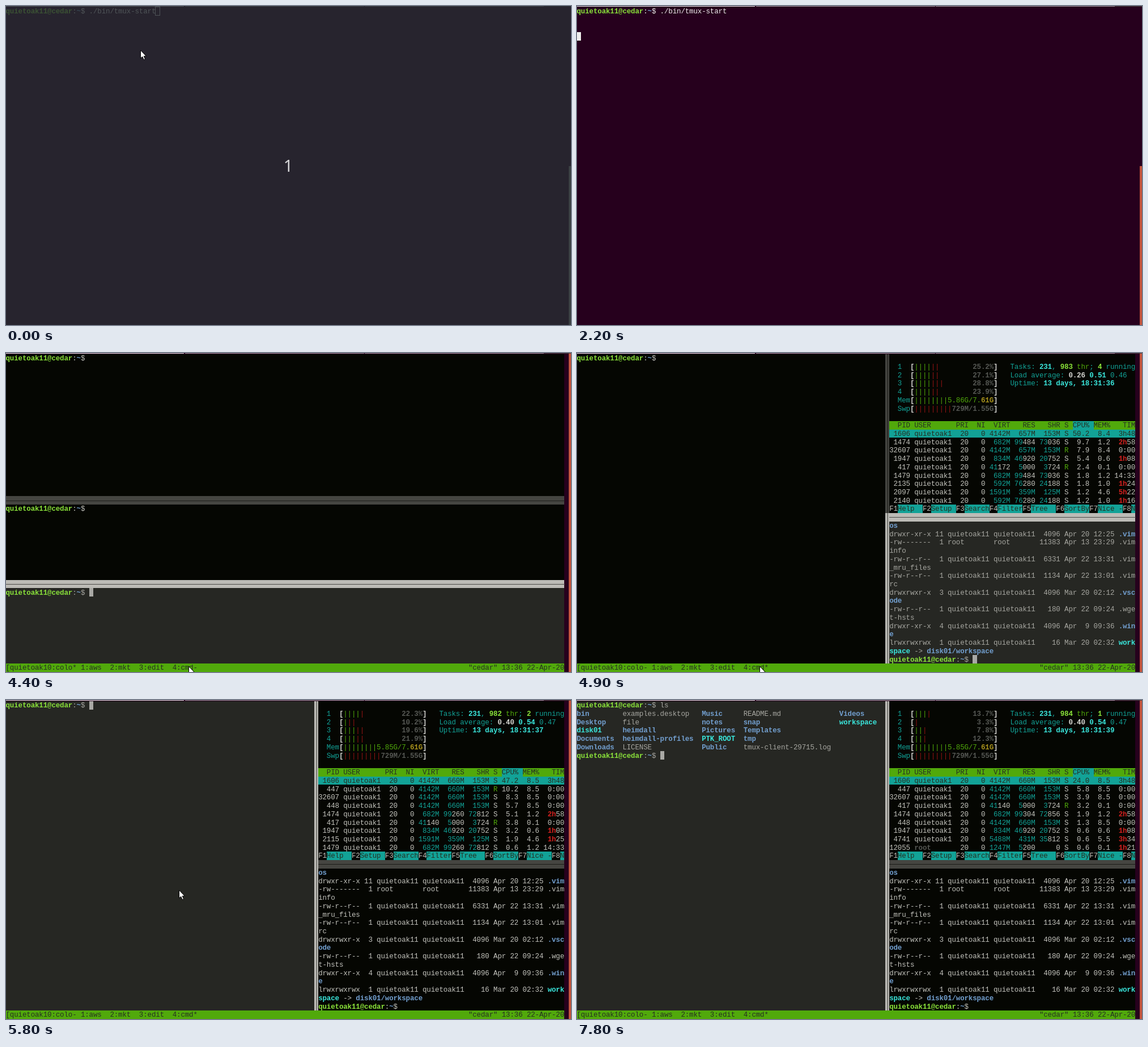
Recreate the animation shown at these times as an HTML page with a canvas. Size 997x562 px, loop 8 s.

```html
<!DOCTYPE html>
<html lang="en">
<head>
<meta charset="utf-8">
<title>Terminal session</title>
<style>
html, body { margin: 0; width: 100%; height: 100%; overflow: hidden; background: #26001d; }
canvas { display: block; }
</style>
</head>
<body>
<canvas id="stage" width="997" height="562"></canvas>
<script>
const ctx = document.getElementById('stage').getContext('2d');
const LOOP = 8000, CW = 7.355, CH = 14.73, TOP = 2, COLS = 134;
const USER = 'quietoak11', SHORT = 'quietoak1', HOST = 'cedar';
const PURPLE = '#26001d', IDLE = '#050602', ACTIVE = '#262723';
const GREEN = '#51a90b', CYAN = '#12a297';

// Upper-case codes are bold
const INK = {
  G: '#8ae23a', B: '#729fcf', C: '#3ae6dc', R: '#d0201f', D: '#555753', W: '#d6d6d2', Y: '#a8921c',
  g: GREEN, c: CYAN, r: '#921313', k: '#262f22', e: '#eeeeec', w: '#c2c2bc'
};
const setActive = on => { INK.w = on ? '#a6a6a0' : '#c2c2bc'; };

const colX = c => c * CW - 0.5;
const rowY = r => TOP + r * CH;

function rect(x, y, w, h, color) {
  ctx.fillStyle = color;
  ctx.fillRect(x, y, w, h);
}

function cells(row, col, rows, cols, color) {
  const x = Math.max(0, Math.round(colX(col))), y = Math.round(rowY(row));
  rect(x, y, Math.round(colX(col + cols)) - x, Math.round(rowY(row + rows)) - y, color);
}

// Writes text on the cell grid; ^x switches to ink x
function put(row, col, text) {
  const y = Math.round(rowY(row) + 11.3);
  const parts = ('^w' + text).split(/\^(.)/);
  for (let i = 1; i < parts.length; i += 2) {
    const code = parts[i];
    ctx.fillStyle = INK[code];
    ctx.font = (code < 'a' ? 'bold ' : '') + '12.5px "Liberation Mono", monospace';
    for (const ch of parts[i + 1]) {
      if (ch !== ' ') ctx.fillText(ch, colX(col), y);
      col++;
    }
  }
}

const prompt = (row, col, cmd = '', ink = 'w') =>
  put(row, col, `^G${USER}@${HOST}^${ink}:^B~^${ink}$ ${cmd}`);

const BLINKS = [1600, 1900, 2500, 3100, 3700, 4300, 5500, 5700, 6100, 6700, 7300, 7500];
const blinkOn = t => BLINKS.filter(b => b <= t).length % 2 === 0;

function cursor(t, row, col, color = '#a9a9a5') {
  if (blinkOn(t)) cells(row, col, 1, 1, color);
}

function tabStrip() {
  rect(0, 0, 314, 1, '#f4f2f3');
  rect(316, 0, 316, 1, '#a79fa5');
  rect(633, 0, 316, 1, '#a79fa5');
  rect(949, 0, 48, 1, '#47403f');
}

function shell(t) {
  rect(0, 0, 997, 562, PURPLE);
  tabStrip();
  prompt(0, 0, './bin/tmux-start', 'e');
  rect(993, 282, 4, 280, t < 1100 ? '#8d8b89' : t < 1200 ? '#a87058' : '#c2553d');
  if (t < 1100) {
    ctx.strokeStyle = INK.e;
    ctx.lineWidth = 1;
    ctx.strokeRect(263.5, 1.5, 8, 15);
  } else if (t < 2200) cursor(t, 0, 36, INK.e);
  else cursor(t, 3, 0, INK.e);
}

function countdown() {
  rect(0, 0, 997, 562, 'rgba(39,45,50,.8)');
  ctx.fillStyle = '#d6d6d8';
  ctx.font = '29px "Noto Sans", sans-serif';
  ctx.textAlign = 'center';
  ctx.fillText('1', 498, 292);
  ctx.textAlign = 'left';
}

const edge = on => on ? ['#bcbbb6', '#4a4a46'] : ['#454541', '#1c1c19'];

function hBorder(row, col, on) {
  const [fill, line] = edge(on), x = Math.max(0, colX(col));
  cells(row, col, 1, COLS - col, fill);
  rect(x, Math.round(rowY(row) + 7.4), 986 - x, 1, line);
}

function vBorder(row, rows, on) {
  const [fill, line] = edge(on);
  cells(row, 74, rows, 1, fill);
  rect(547.5, rowY(row), 1.2, rows * CH, line);
}

function tmuxFrame(second) {
  rect(0, 0, 997, 562, PURPLE);
  tabStrip();
  rect(993, 1, 4, 561, '#c2553d');
  cells(0, 0, 37, COLS, IDLE);
  cells(37, 0, 1, COLS, GREEN);
  const [a, b] = second ? '-*' : '*-';
  put(37, 0, `^k[${SHORT}0:colo${a} 1:aws  2:mkt  3:edit  4:cmd${b}`);
  put(37, 111, `^k"${HOST}" 13:36 22-Apr-20`);
}

function firstWindow(t) {
  tmuxFrame(false);
  cells(28, 0, 9, COLS, ACTIVE);
  hBorder(17, 0, false);
  hBorder(27, 0, true);
  setActive(false);
  prompt(0, 0);
  prompt(18, 0);
  setActive(true);
  prompt(28, 0);
  cursor(t, 28, 20);
}

// cpu: green bars, red bars, percent; procs: pid virt res shr state cpu mem time [user]
const SAMPLES = [
  {
    from: 4900, cpu: [[4, 2, '25.2'], [4, 2, '27.1'], [4, 3, '28.8'], [4, 2, '23.9']],
    thr: 983, run: 4, load: ['0.26', '0.51', '0.46'], sec: 36, mem: '5.86',
    procs: `1606 4142M 657M 153M S 50.2 8.4 3h48
1474 682M 99484 73036 S 9.7 1.2 2h58
32607 4142M 657M 153M R 7.9 8.4 0:00
1947 834M 46920 20752 S 5.4 0.6 1h08
417 41172 5000 3724 R 2.4 0.1 0:00
1479 682M 99484 73036 S 1.8 1.2 14:33
2135 592M 76280 24188 S 1.8 1.0 1h24
2097 1591M 359M 125M S 1.2 4.6 5h22
2140 592M 76280 24188 S 1.2 1.0 1h16`
  },
  {
    from: 5800, cpu: [[4, 1, '22.3'], [1, 2, '10.2'], [3, 2, '19.6'], [3, 2, '21.9']],
    thr: 982, run: 2, load: ['0.40', '0.54', '0.47'], sec: 37, mem: '5.85',
    procs: `1606 4142M 660M 153M S 47.2 8.5 3h48
447 4142M 660M 153M R 10.2 8.5 0:00
32607 4142M 660M 153M S 8.3 8.5 0:00
448 4142M 660M 153M S 5.7 8.5 0:00
1474 682M 99260 72812 S 5.1 1.2 2h58
417 41140 5000 3724 R 3.8 0.1 0:00
1947 834M 46920 20752 S 3.2 0.6 1h08
2115 1591M 359M 125M S 1.9 4.6 1h25
1479 682M 99260 72812 S 0.6 1.2 14:33`
  },
  {
    from: 7700, cpu: [[3, 1, '13.7'], [0, 1, '3.3'], [2, 1, '7.8'], [2, 1, '12.3']],
    thr: 984, run: 1, load: ['0.40', '0.54', '0.47'], sec: 39, mem: '5.85',
    procs: `1606 4142M 660M 153M S 24.0 8.5 3h48
447 4142M 660M 153M S 5.8 8.5 0:00
32607 4142M 660M 153M S 3.9 8.5 0:00
417 41140 5000 3724 R 3.2 0.1 0:00
1474 682M 99304 72856 S 1.9 1.2 2h58
448 4142M 660M 153M S 1.3 8.5 0:00
1947 834M 46920 20752 S 0.6 0.6 1h08
4741 5488M 431M 35812 S 0.6 5.5 3h34
12055 1247M 5200 0 S 0.6 0.1 1h21 root`
  }
];

const bars = n => '|'.repeat(n);

function size(v) {
  const s = v.padStart(5);
  return v.endsWith('M') ? `^c${s}^w` : `^c${s.slice(0, 2)}^w${s.slice(2)}`;
}

function process(line, i) {
  const [pid, virt, res, shr, state, cpu, mem, time, user = SHORT] = line.split(' ');
  const name = user.padEnd(9);
  const text = pid.padStart(5) + ' ' + (user === 'root' ? `^D${name}^w` : name) + '  20   0 ' +
    [virt, res, shr].map(size).join(' ') + ` ${state === 'R' ? '^gR^w' : state} ` +
    cpu.padStart(4) + ' ' + mem.padStart(4) + ' ' +
    time.padStart(5).replace(/\d+h/, '^R$&^w');
  if (i) return put(9 + i, 75, text);
  cells(9, 75, 1, 59, CYAN);
  put(9, 75, '^k' + text.replace(/\^./g, ''));
}

function htop(t) {
  const s = SAMPLES.filter(s => s.from <= t).pop();
  s.cpu.forEach(([g, r, pct], i) => {
    put(1 + i, 77, `^c${i + 1}  ^W[^g${bars(g)}^r${bars(r)}`);
    put(1 + i, 95, `^D${(pct + '%').padStart(5)}^W]`);
  });
  put(5, 77, `^cMem^W[^g${bars(8)}${s.mem}G/7.^Y61G^W]`);
  put(6, 77, `^cSwp^W[^r${bars(9)}^D729M/1.55G^W]`);
  put(1, 104, `^cTasks: ^C231^c, ^G${s.thr}^g thr^c; ^G${s.run}^c running`);
  put(2, 104, `^cLoad average: ^W${s.load[0]} ^C${s.load[1]} ^c${s.load[2]}`);
  put(3, 104, `^cUptime: ^C13 days, 18:31:${s.sec}`);

  cells(8, 75, 1, 59, GREEN);
  cells(8, 119, 1, 5, CYAN);
  put(8, 75, '^k  PID USER      PRI  NI  VIRT   RES   SHR S CPU% MEM%   TIM');
  s.procs.split('\n').forEach(process);

  ['Help', 'Setup', 'Search', 'Filter', 'Tree', 'SortBy', 'Nice -', 'N'].forEach((label, i) => {
    const col = 75 + i * 8;
    cells(18, col + 2, 1, i < 7 ? 6 : 1, CYAN);
    put(18, col, `^WF${i + 1}^k${label}`.replace('^W', '^w'));
  });
}

function listing() {
  const own = `${USER} ${USER} `, root = 'root       root       ';
  [
    '^Bos',
    `drwxr-xr-x 11 ${own} 4096 Apr 20 12:25 ^B.vim`,
    `-rw-------  1 ${root}11383 Apr 13 23:29 .vim`,
    'info',
    `-rw-r--r--  1 ${own} 6331 Apr 22 13:31 .vim`,
    '_mru_files',
    `-rw-r--r--  1 ${own} 1134 Apr 22 13:01 .vim`,
    'rc',
    `drwxrwxr-x  3 ${own} 4096 Mar 20 02:12 ^B.vsc`,
    '^Bode',
    `-rw-r--r--  1 ${own}  180 Apr 22 09:24 .wge`,
    't-hsts',
    `drwxr-xr-x  4 ${own} 4096 Apr  9 09:36 ^B.win`,
    '^Be',
    `lrwxrwxrwx  1 ${own}   16 Mar 20 02:32 ^Cwork`,
    '^Cspace^w -> ^Bdisk01/workspace'
  ].forEach((line, i) => put(20 + i, 75, line));
  prompt(36, 75);
}

const FILES = [
  [0, '^Bbin', '^BDesktop', '^Cdisk01', '^BDocuments', '^BDownloads'],
  [11, 'examples.desktop', 'file', '^Bheimdall', '^Bheimdall-profiles', 'LICENSE'],
  [30, '^BMusic', '^Bnotes', '^BPictures', '^CPTK_ROOT', '^BPublic'],
  [40, 'README.md', '^Bsnap', '^BTemplates', '^Btmp', 'tmux-client-29715.log'],
  [63, '^BVideos', '^Cworkspace']
];

function secondWindow(t) {
  const left = t >= 5800;
  tmuxFrame(true);
  if (left) cells(0, 0, 37, 74, ACTIVE);
  else cells(20, 75, 17, 59, ACTIVE);
  vBorder(0, 19, left);
  vBorder(19, 18, true);
  hBorder(19, 75, !left);

  setActive(left);
  prompt(0, 0, 'ls'.slice(0, t < 7500 ? 0 : t < 7600 ? 1 : 2));
  const done = t >= 7800;
  if (done) {
    for (const [col, ...names] of FILES) names.forEach((n, i) => put(1 + i, col, n));
    prompt(6, 0);
  }
  setActive(false);
  htop(t);
  setActive(!left);
  listing();

  if (!left) cursor(t, 36, 95);
  else if (done) cursor(t, 6, 20);
  else cursor(t, 0, t < 7500 ? 20 : t < 7600 ? 21 : 22);
}

// time, x, y of the pointer tip
const PATH = [
  [2900, 237, 79], [3000, 237, 79], [3900, 317, 541], [4100, 325, 551], [4400, 322, 552],
  [5300, 322, 552], [5500, 305, 340], [5600, 305, 340], [5700, 305, 335], [7500, 305, 335]
];

function arrow(x, y) {
  ctx.beginPath();
  [[0, 0], [0, 14], [3.2, 11.2], [5.6, 16.6], [8, 15.6], [5.7, 10.4], [9.8, 10.2]]
    .forEach(([dx, dy]) => ctx.lineTo(x + dx + 0.5, y + dy));
  ctx.closePath();
  ctx.fillStyle = '#fff';
  ctx.fill();
  ctx.strokeStyle = '#000';
  ctx.lineWidth = 1;
  ctx.stroke();
}

function iBeam(x, y) {
  rect(x - 0.5, y - 6, 1.3, 13, '#d4ced2');
  rect(x - 3, y - 7, 6, 1.2, '#d4ced2');
  rect(x - 3, y + 6, 6, 1.2, '#d4ced2');
}

function pointer(t) {
  if (t < 500) return arrow(237, 78);
  if (t < 1900) return iBeam(239, 79.5);
  if (t < 2900 || t >= 7500) return;
  const i = PATH.findIndex(p => p[0] > t);
  const [t0, x0, y0] = PATH[i - 1], [t1, x1, y1] = PATH[i];
  const u = (t - t0) / (t1 - t0), k = u * u * (3 - 2 * u);
  arrow(x0 + (x1 - x0) * k, y0 + (y1 - y0) * k);
}

function draw(now) {
  const t = Math.floor(now % LOOP / 100) * 100;
  if (t < 2400) shell(t);
  else if (t < 4900) firstWindow(t);
  else secondWindow(t);
  if (t < 500) countdown();
  pointer(t);
}

const start = performance.now();
function tick() {
  draw(performance.now() - start);
  requestAnimationFrame(tick);
}
tick();
</script>
</body>
</html>
```
